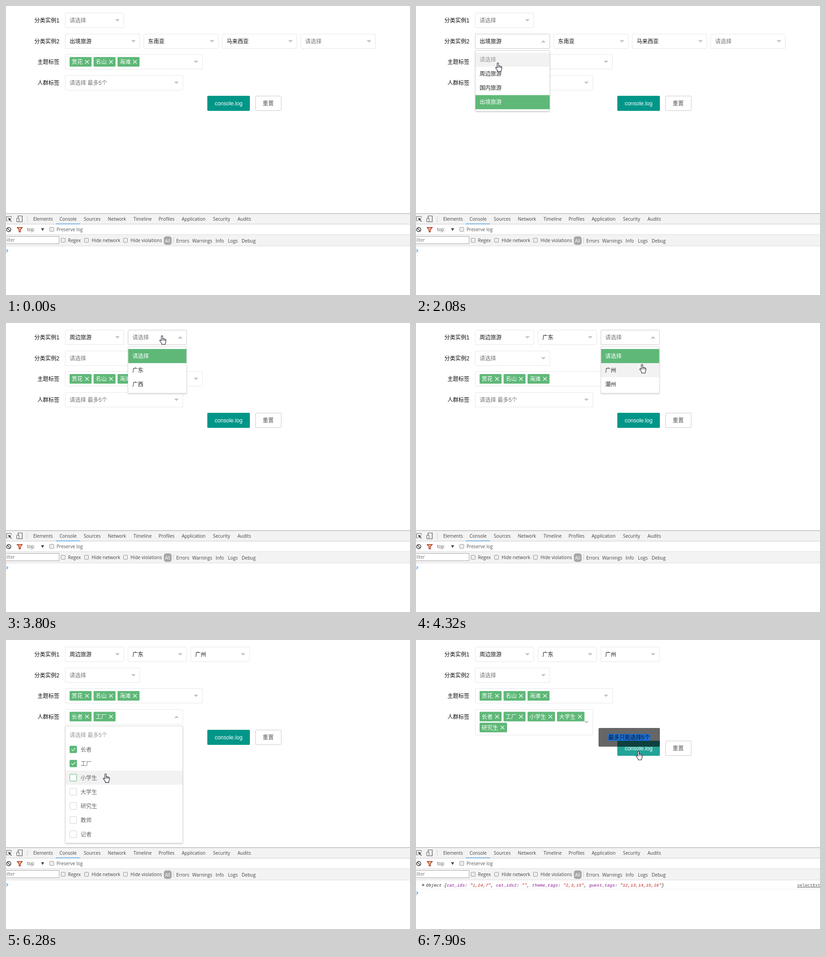
Write an HTML page that moves like this. It is 883 by 634 pixels and loops after 8 s.

```html
<!DOCTYPE html>
<html lang="zh">
<head>
<meta charset="utf-8">
<title>Cascading selects</title>
<style>
html, body { margin: 0; width: 100%; height: 100%; overflow: hidden; background: #fff; }
svg { display: block; width: 100vw; height: 100vh; cursor: default; }
text { font: 12px "Liberation Sans", "Noto Sans CJK SC", "Noto Sans CJK", sans-serif; white-space: pre; }
text.ui { font: 10px "Open Sans", "Noto Sans", sans-serif; }
text.mono { font: italic 9.44px "Liberation Mono", monospace; }
</style>
</head>
<body>
<svg id="stage" viewBox="0 0 883 634" xmlns="http://www.w3.org/2000/svg"></svg>
<script>
const LOOP = 8000, GREEN = '#5fb878', LINE = '#e6e6e6', DARK = '#c9c9c9', LEFT = 129.5;
const HINT = '请选择', TRIPS = [HINT, '周边旅游', '国内旅游', '出境旅游'];
const GUESTS = ['长者', '工厂', '小学生', '大学生', '研究生', '教师', '记者'];
const TICKS = [6010, 6130, 6400, 6780, 7150];

// pointer moves: first step, last step, step count, end x, end y
const MOVES = [
  [520, 520, 1, 722, 117], [640, 880, 3, 753, 547], [1030, 1410, 4, 343, 168],
  [1560, 1680, 2, 262, 98], [1830, 1950, 2, 180, 80], [2080, 2080, 1, 173, 124],
  [2210, 2330, 2, 185, 48], [2480, 2600, 2, 197, 30], [2990, 2990, 1, 193, 71],
  [3120, 3250, 2, 205, 97], [3400, 3650, 3, 335, 27], [3930, 3930, 1, 335, 92],
  [4060, 4190, 2, 485, 28], [4320, 4320, 1, 488, 90], [4730, 4730, 1, 540, 82],
  [4850, 4970, 2, 415, 106], [5140, 5510, 4, 258, 172], [5630, 5630, 1, 208, 241],
  [5780, 5780, 1, 211, 243], [6130, 6130, 1, 212, 285], [6280, 6510, 3, 211, 308],
  [6660, 7020, 4, 201, 360], [7270, 7400, 2, 203, 412], [7520, 7900, 4, 480, 243]
];

const rect = (x, y, w, h, fill, stroke = 'none', rx = 0, more = '') =>
  `<rect x="${x}" y="${y}" width="${w}" height="${h}" fill="${fill}" stroke="${stroke}" rx="${rx}" ${more}/>`;
const path = (d, stroke, width = 1, fill = 'none', more = '') =>
  `<path d="${d}" stroke="${stroke}" stroke-width="${width}" fill="${fill}" ${more}/>`;
const text = (x, y, s, fill = '#111', more = '') =>
  `<text x="${x}" y="${y}" fill="${fill}" ${more}>${s}</text>`;
const ui = (x, y, s, fill = '#444') => text(x, y, s, fill, 'class="ui"');

let pointer, hand, covered;

function pointerAt(t) {
  let pos = null;
  for (const [t0, t1, n, x, y] of MOVES) {
    if (t < t0) break;
    const from = pos || { x, y };
    const gap = n > 1 ? (t1 - t0) / (n - 1) : 1;
    const k = Math.min(n, Math.floor((t - t0) / gap + 0.001) + 1) / n;
    pos = { x: from.x + (x - from.x) * k, y: from.y + (y - from.y) * k };
  }
  return pos;
}

function over(x, y, w, h) {
  if (!pointer) return false;
  const px = pointer.x + 6, py = pointer.y;
  return px >= x && px < x + w && py >= y && py < y + h;
}

function hot(x, y, w, h) {
  const hit = !covered && over(x, y, w, h);
  if (hit) hand = true;
  return hit;
}

function box(x, y, w, h, open, dark) {
  const cx = x + w - 14, cy = y + h / 2, d = open ? -2.5 : 2.5;
  const hit = hot(x, y, w, h);
  return rect(x, y, w, h, '#fff', hit || dark ? DARK : LINE, 1.7) +
    path(`M${cx - 5} ${cy - d}h10l-5 ${2 * d}z`, 'none', 0, '#c2c2c2');
}

function select(x, y, w, value, open) {
  return box(x, y, w, 32, open, open) +
    text(x + 9.5, y + 20.7, value || HINT, value ? '#111' : '#757575');
}

function menuFrame(x, y, w, rows) {
  const h = rows * 31 + 9;
  if (over(x, y, w, h)) covered = hand = true;
  return rect(x, y, w, h, '#fff', '#d2d2d2', 1.7, 'filter="url(#shade)"');
}

function menu(x, y, w, items, chosen) {
  return menuFrame(x, y, w, items.length) + items.map((s, i) => {
    const top = y + 5 + i * 31, on = s === chosen;
    const bg = on ? GREEN : over(x, top, w, 31) ? '#f2f2f2' : '#fff';
    return rect(x + .5, top, w - 1, 31, bg) +
      text(x + 9.5, top + 19.8, s, on ? '#fff' : i ? '#222' : '#999');
  }).join('');
}

function checkMenu(y, count) {
  const w = 257;
  let out = menuFrame(LEFT, y, w, GUESTS.length + 1) + text(139, y + 24.3, '请选择 最多5个', '#999');
  GUESTS.forEach((s, i) => {
    const top = y + 36 + i * 31, on = i < count, hit = over(LEFT, top, w, 31);
    if (hit) out += rect(LEFT + .5, top, w - 1, 31, '#f2f2f2');
    out += rect(139.5, top + 8, 15, 15, on ? GREEN : '#fff', on || hit ? GREEN : '#d2d2d2', 1.5);
    if (on) out += path(`M143 ${top + 15.5}l3 3 5.5-6`, '#fff', 1.2);
    out += text(163, top + 20, s, '#666');
  });
  return out;
}

function tags(names, y) {
  let x = 139;
  return names.map((s, i) => {
    if (i === 4) { x = 139; y += 24; }
    const w = s.length * 12 + 24, cx = x + w - 10, cy = y + 10.5;
    const out = rect(x, y, w, 21, GREEN, 'none', 1.5) + text(x + 4.5, y + 15, s, '#fff') +
      path(`M${cx - 4} ${cy - 4}l8 8m0-8l-8 8`, '#fff', 1.1);
    x += w + 4.4;
    return out;
  }).join('');
}

function form(t) {
  const within = (a, b) => t >= a && t < b;
  const col1 = i => LEFT + i * 137.3, col2 = i => LEFT + i * 171.6;
  const count = TICKS.filter(v => t >= v).length;
  const grow = count > 4 ? 24 : 0;
  const open1 = [within(2860, 3400), within(3800, 4060), within(4190, 4560)];
  const open2 = within(1950, 2210), openGuests = within(5630, 7900);
  const row1 = ['周边旅游', '广东', '广州'].map((s, i) => t >= [3400, 4060, 4560][i] ? s : null);
  const shown1 = Math.min(3, row1.filter(Boolean).length + 1);
  const row2 = t < 2210 ? ['出境旅游', '东南亚', '马来西亚', null] : [null];
  const lists = [TRIPS, [HINT, '广东', '广西'], [HINT, '广州', '潮州']];

  let menus = '';
  open1.forEach((o, i) => { if (o) menus += menu(col1(i), 52, 128, lists[i], HINT); });
  if (open2) menus += menu(LEFT, 97.5, 163, TRIPS, '出境旅游');
  if (openGuests) menus += checkMenu(188.5 + grow, count);

  let out = ['分类实例1', '分类实例2', '主题标签', '人群标签']
    .map((s, i) => text(116.7, 36.2 + i * 45.5, s, '#111', 'text-anchor="end"')).join('');
  for (let i = 0; i < shown1; i++) out += select(col1(i), 15.5, 128, row1[i], open1[i]);
  row2.forEach((s, i) => { out += select(col2(i), 61.5, 163, s, open2 && !i); });
  out += box(LEFT, 106.5, 300, 32) + tags(['赏花', '名山', '海滩'], 112);
  out += box(LEFT, 152.5, 257, 32 + grow, openGuests);
  out += count ? tags(GUESTS.slice(0, count), 157.5) : text(139, 173.2, '请选择 最多5个', '#757575');

  const by = 197 + grow, mid = 'text-anchor="middle"';
  const lit = hot(440, by, 93, 33);
  out += `<g opacity="${lit ? .86 : 1}">` + rect(440, by, 93, 33, '#009688', 'none', 1.7) +
    text(486.5, by + 21, 'console.log', '#fff', mid) + '</g>';
  hot(545, by, 57, 33);
  out += rect(545.5, by + .5, 56, 32, '#fff', DARK, 1.7) + text(573, by + 21.3, '重置', '#555', mid);
  out += menus;
  if (t >= 7400) {
    out += rect(399, 193, 134, 41, 'rgba(0,0,0,.6)', 'none', 2) +
      rect(420, 206, 92, 15, '#1a6ed8') + text(420.5, 218, '最多只能选择5个', '#101418');
  }
  return out;
}

function consoleLine() {
  const span = (s, fill) => `<tspan fill="${fill}">${s}</tspan>`;
  const pairs = [['cat_ids', '1,24,7'], ['cat_ids2', ''], ['theme_tags', '2,3,15'], ['guest_tags', '12,13,14,15,16']];
  const body = pairs.map(([k, v]) => span(k, '#881391') + ': ' + span(`"${v}"`, '#c41a16')).join(', ');
  return path('M14 534.5l5 3-5 3z', 'none', 0, '#666') +
    text(22, 541, `Object {${body}}`, '#222', 'class="mono"') +
    text(833, 541, 'selectExt', '#545454', 'class="mono" style="font-style:normal" text-decoration="underline"') +
    path('M0 546.5H883', '#eee');
}

function devtools(t) {
  const check = (x, y) => rect(x + .5, y + .5, 9, 9, '#eee', '#999', 1.5);
  const list = (items, y, fill) => items.map(([x, s]) => ui(x, y, s, fill)).join('');
  const logged = t >= 7900;
  let out = rect(0, 455, 883, 179, '#fff') + rect(0, 455, 883, 24, '#f3f3f3') +
    rect(0, 502, 883, 25, '#f3f3f3') + path('M0 455.5H883', '#a3a3a3') +
    path('M0 478.5H883', '#ccc') + path('M0 501.5H883M0 526.5H883', '#ddd') +
    path('M109 478H162', '#5ba7e6', 1.6);
  // toolbar icons
  out += path('M11.5 465V461.5H1.5V471.5H4', '#666') +
    path('M5 464.5l7 3-3 1 3.5 4-1 1-3.5-4-1.5 2.5z', 'none', 0, '#444') +
    path('M26.5 465V460.5H35.5V473.5H29', '#555', 1.2) + rect(23.5, 465.5, 5, 8, '#f3f3f3', '#555', .5) +
    path('M46.5 461V474', '#ccc') +
    `<circle cx="6" cy="490.5" r="4.6" fill="none" stroke="#444" stroke-width="1.6"/>` +
    path('M2.8 487.3l6.4 6.4', '#444', 1.6) +
    path('M24.5 486H35.5L31.5 490.5V495.5H28.5V490.5Z', '#a82a10', 1.4, '#f3c9a0') +
    path('M76.5 487.5h7l-3.5 6z', 'none', 0, '#444');
  out += list([[59.5, 'Elements'], [117, 'Console'], [170, 'Sources'], [222.5, 'Network'], [278.5, 'Timeline'],
    [333.5, 'Profiles'], [384, 'Application'], [452.5, 'Security'], [506, 'Audits']], 471);
  out += list([[46, 'top'], [110.5, 'Preserve log']], 494, '#555') + check(95, 485);
  out += rect(-5.5, 505.5, 121.5, 16, '#fff', '#a6a6a6') + ui(-4, 517.3, 'Filter', '#777');
  out += check(120, 509) + check(171, 509) + check(256, 509);
  out += list([[135.5, 'Regex'], [187, 'Hide network'], [272, 'Hide violations']], 518);
  out += rect(345, 505.5, 17, 18.5, '#a6a6a6', 'none', 5) + ui(347.5, 518.5, 'All', '#fff') +
    path('M366.5 507V521', '#ccc');
  out += list([[372, 'Errors'], [407, 'Warnings'], [458, 'Info'], [485, 'Logs'], [515, 'Debug']], 518.7);
  if (logged) out += consoleLine();
  return out + path(`M1 ${logged ? 552 : 534}l3 3-3 3`, '#3c8fd8', 1.4);
}

function cursor() {
  if (!pointer) return '';
  const shape = hand
    ? 'M4.5 1.6Q6 0 7.5 1.6V8Q9 6.4 10.2 8Q11.5 7 12.6 8.8Q14.5 8.4 14.5 10.4V14L13 17.5V20H5.5V18L1 12Q.8 9.8 3 10.3L4.5 12Z'
    : 'M.6 .8V15.6L4 12.4L6.5 18.2L8.8 17.2L6.4 11.6H11.2Z';
  return `<g transform="translate(${pointer.x} ${pointer.y})">` +
    path(shape, '#1c1c28', 1.1, '#fff', 'stroke-linejoin="round"') +
    (hand ? path('M7.5 8V12M10.2 8.5V12M12.6 9.5V12', '#1c1c28', .9) : '') + '</g>';
}

const stage = document.getElementById('stage');
const defs = '<defs><filter id="shade" x="-10%" y="-10%" width="120%" height="125%">' +
  '<feDropShadow dx="0" dy="2" stdDeviation="1.6" flood-color="#000" flood-opacity=".14"/></filter></defs>';
let last = '';

function draw(t) {
  pointer = pointerAt(t);
  hand = covered = false;
  const next = defs + form(t) + devtools(t) + cursor();
  if (next !== last) stage.innerHTML = last = next;
}

const start = performance.now();
function tick() {
  draw((performance.now() - start) % LOOP);
  requestAnimationFrame(tick);
}
tick();
</script>
</body>
</html>
```
